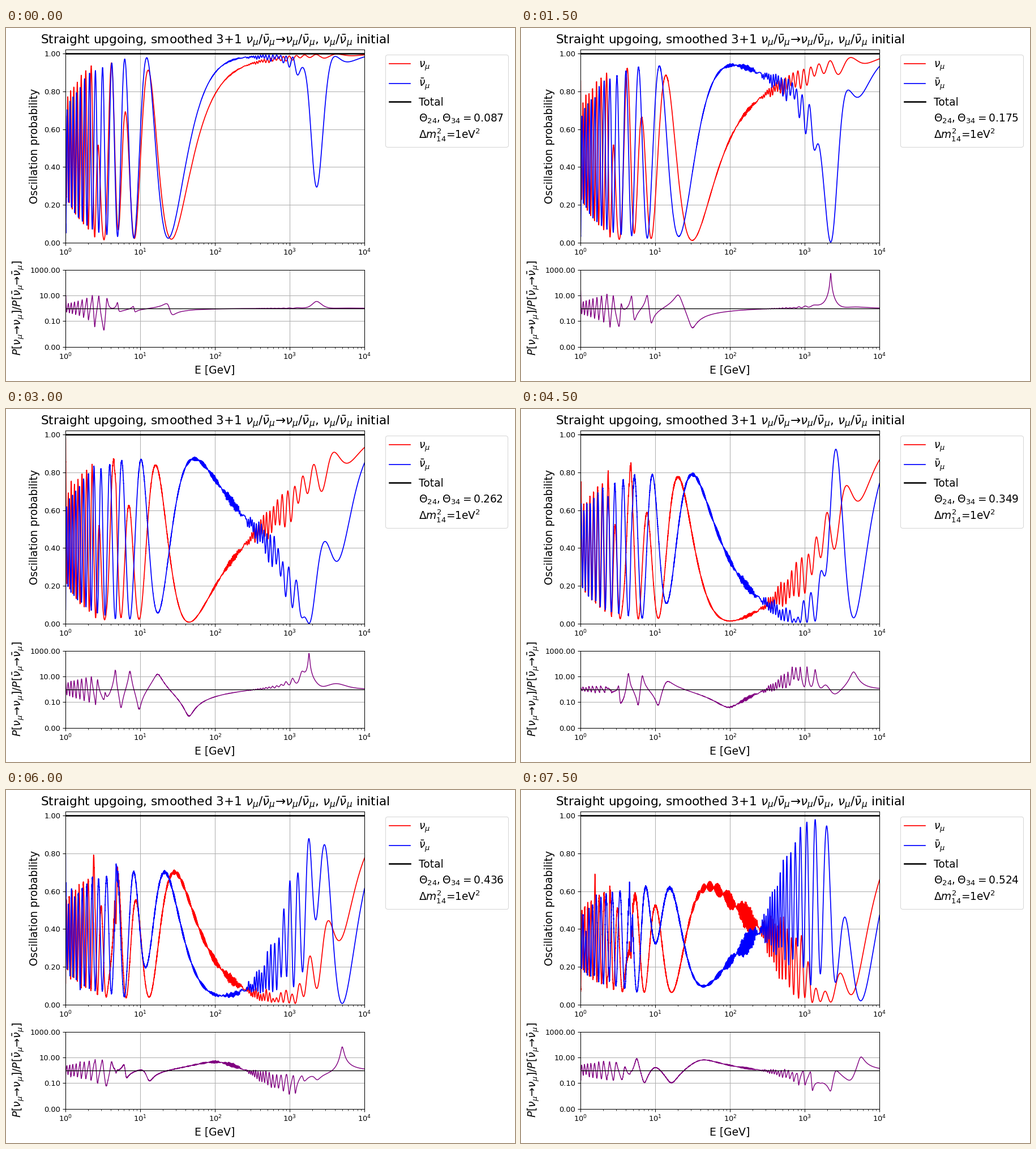
A matplotlib script for the animation above (8000 ms loop, 899x623 px).

```python
import numpy as np
import matplotlib.pyplot as plt
from matplotlib.animation import FuncAnimation
from matplotlib.ticker import FormatStrFormatter

W, H, DPI = 899, 623, 72          # at 72 dpi one point is one pixel
STEP_MS, LOOP_MS, HOLD = 500, 8000, 3
ANGLES = np.radians([5, 10, 15, 20, 25, 30])

# ---------- neutrino oscillations through the Earth (3+1 flavours) ----------
N, WINDOW = 10000, 51
ENERGY = np.logspace(0, 4, N)
MASSES = np.array([0, 7.42e-5, 2.517e-3, 1.0])
TH12, TH13, TH23 = np.radians([33.44, 8.57, 49.2])
R_EARTH = 6371.0

# outer radius, inner radius, electron fraction, density polynomial, slices
SHELLS = [
    (6371, 5701, 0.496, (3.6,), 1),
    (5701, 3480, 0.496, (7.9565, -6.4761, 5.5283, -3.0807), 2),
    (3480, 1221, 0.466, (12.5815, -1.2638, -3.6426, -5.5281), 3),
    (1221, 0, 0.466, (13.0885, 0, -8.8381), 1),
]


def earth_slices():
    for outer, inner, ye, poly, count in SHELLS:
        edges = np.linspace(outer, inner, count + 1)
        for a, b in zip(edges, edges[1:]):
            x = np.linspace(b, a, 50) / R_EARTH
            rho = np.polynomial.polynomial.polyval(x, poly).mean()
            yield a - b, rho, ye


def rotation(i, j, angle):
    m = np.eye(4)
    m[i, i] = m[j, j] = np.cos(angle)
    m[i, j], m[j, i] = np.sin(angle), -np.sin(angle)
    return m


def survival(angle, sign):
    """Muon flavour survival; sign is -1 for antineutrinos."""
    mix = (rotation(2, 3, angle) @ rotation(1, 3, angle)
           @ rotation(1, 2, TH23) @ rotation(0, 2, TH13) @ rotation(0, 1, TH12))
    vacuum = 2.5339 * (mix * MASSES) @ mix.T / ENERGY[:, None, None]
    psi = np.zeros((N, 4, 1), complex)
    psi[:, 1] = 1
    for length, rho, ye in earth_slices():
        v = sign * 3.867e-4 * rho
        lam, vec = np.linalg.eigh(vacuum + np.diag([v * ye, 0, 0, v * (1 - ye) / 2]))
        psi = np.swapaxes(vec, 1, 2) @ psi
        psi = vec @ (np.exp(-1j * lam * length)[..., None] * psi)
    # the second half of the path mirrors the first
    return np.abs((psi[..., 0] ** 2).sum(1)) ** 2


def smooth(p):
    """Running mean whose window narrows towards both ends."""
    total = np.concatenate([[0], np.cumsum(p)])
    i = np.arange(N)
    half = np.minimum(WINDOW // 2, np.minimum(i, N - 1 - i))
    return (total[i + half + 1] - total[i - half]) / (2 * half + 1)


CURVES = [(smooth(survival(a, 1)), smooth(survival(a, -1))) for a in ANGLES]

# ---------- figure ----------
NU, NUBAR = r"\nu_{\mu}", r"\bar{\nu}_{\mu}"
PAIR = f"${NU}/{NUBAR}$"
TITLE, LABEL, LEGEND, TICK = 21.6, 18.72, 18.6, 13

plt.rcParams["font.family"] = "DejaVu Sans"
fig = plt.figure(figsize=(W / DPI, H / DPI), dpi=DPI, facecolor="white")


def panel(top, bottom):
    ax = fig.add_axes([105.3 / W, 1 - bottom / H, 528 / W, (bottom - top) / H])
    ax.set_xscale("log")
    ax.set_xlim(1, 1e4)
    ax.grid(color="#b0b0b0", lw=1.04)
    ax.tick_params(labelsize=TICK, length=4.55, width=1.04, pad=4.55)
    ax.tick_params(which="minor", length=2.6, width=0.78)
    for spine in ax.spines.values():
        spine.set_linewidth(1.04)
    return ax


def side_label(x, y, text):
    fig.text(x / W, 1 - y / H, text, size=LABEL, rotation=90, ha="center", va="center")


def angle_label(angle):
    return (rf"$\Theta_{{24}},\Theta_{{34}}={angle:.3f}$" + "\n"
            + r"$\Delta m^2_{14}$=1eV$^2$")


main = panel(37.6, 378.6)
main.set_ylim(0, 1.0235)
main.yaxis.set_major_formatter(FormatStrFormatter("%.2f"))
red, = main.plot([], [], color="red", lw=1.7)
blue, = main.plot([], [], color="blue", lw=1.7)
total, = main.plot([1, 1e4], [1, 1], color="black", lw=2.6)
blank, = main.plot([], [], " ")

ratio = panel(426.6, 562.6)
ratio.set_yscale("log")
ratio.set_ylim(1e-3, 1e3)
ratio.set_yticks([1e-3, 1e-1, 10, 1e3])
ratio.yaxis.set_major_formatter(FormatStrFormatter("%.2f"))
ratio.tick_params(axis="y", which="minor", left=False)
purple, = ratio.plot([], [], color="purple", lw=1.4)
ratio.axhline(1, color="black", lw=1.3)

fig.text(369.8 / W, 1 - 28.5 / H,
         f"Straight upgoing, smoothed 3+1 {PAIR}→{PAIR}, {PAIR} initial",
         size=TITLE, ha="center", va="baseline")
fig.text(369 / W, 1 - 610 / H, "E [GeV]", size=LABEL, ha="center", va="baseline")
side_label(51, 208.5, "Oscillation probability")
side_label(22, 494, f"$P[{NU}$→${NU}]/P[{NUBAR}$→${NUBAR}]$")

legend = main.legend(
    [red, blue, total, blank],
    [f"${NU}$", f"${NUBAR}$", "Total", angle_label(ANGLES[0])],
    loc="upper left", bbox_to_anchor=(669.8 / W, 1 - 47 / H),
    bbox_transform=fig.transFigure, borderaxespad=0, fontsize=LEGEND)
legend.get_frame().set_linewidth(1.04)
angle_text = legend.get_texts()[3]


def draw(i):
    k = i // HOLD
    p, pbar = CURVES[k]
    red.set_data(ENERGY, p)
    blue.set_data(ENERGY, pbar)
    purple.set_data(ENERGY, p / pbar)
    angle_text.set_text(angle_label(ANGLES[k]))
    return red, blue, purple, angle_text


anim = FuncAnimation(fig, draw, frames=LOOP_MS // STEP_MS, interval=STEP_MS,
                     init_func=lambda: draw(0), repeat=True, repeat_delay=0)
plt.show()
```
